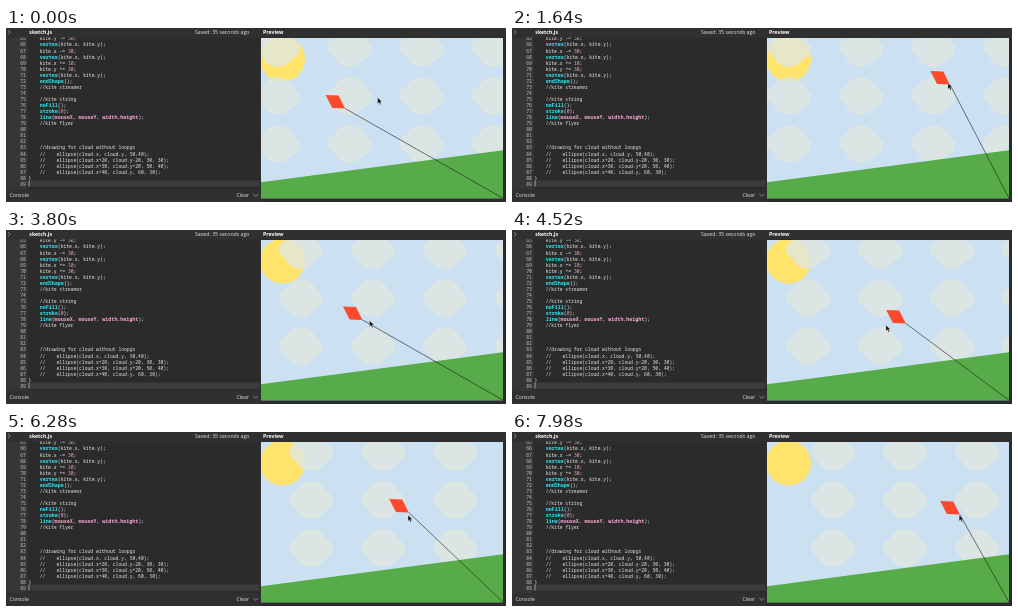
Recreate the animation shown at these times as an HTML page. Size 500 px wide and 174 px high, loop 8 s.

```html
<!DOCTYPE html>
<html lang="en">
<head>
<meta charset="utf-8">
<title>Kite sketch</title>
<style>
  html, body { margin: 0; width: 100%; height: 100%; overflow: hidden; background: #2b2b2b; }
  svg { display: block; width: 100vw; height: 100vh; }
  text { white-space: pre; }
  .ui { font: 5.2px "Open Sans", "Noto Sans", sans-serif; fill: #e4e4e4; }
  .title { font-weight: 700; fill: #fff; }
  .code { font: 500 4.7px "Noto Sans Mono", "DejaVu Sans Mono", monospace; fill: #f2f2f2; }
  .num { fill: #c4c4c4; }
  .fn, .var { font-size: 5.05px; font-weight: 700; }
  .fn { fill: #2fe6ee; }
  .var, .lit { fill: #f7a6d3; }
  .note { fill: #e4e4e4; }
</style>
</head>
<body>
<svg viewBox="0 0 500 174" preserveAspectRatio="none">
  <defs>
    <clipPath id="stage"><rect x="255" y="10" width="242" height="160.3"/></clipPath>
    <g id="cloud" fill="#e0e7e1" opacity=".8">
      <ellipse rx="17.5" ry="19"/>
      <ellipse cx="-8" cy="-.5" rx="14" ry="10.5"/>
      <ellipse cx="9" cy="1" rx="13.5" ry="10.5"/>
    </g>
  </defs>

  <rect width="500" height="174" fill="#2b2b2b"/>
  <rect y="9" width="21.5" height="152" fill="#363636"/>
  <rect x="21.5" y="152.6" width="232" height="6.2" fill="#3c3c3c"/>
  <path d="M23 153v5.5" stroke="#ddd" stroke-width=".6"/>
  <g id="code" class="code"></g>

  <rect width="500" height="9.5" fill="#303030"/>
  <rect y="161" width="254" height="13" fill="#303030"/>
  <rect x="253.3" width="1.7" height="174" fill="#303030"/>
  <g class="ui">
    <text class="title" x="23.3" y="6">sketch.js</text>
    <text x="189" y="6">Saved: 35 seconds ago</text>
    <text class="title" x="257" y="6">Preview</text>
    <text x="3.5" y="169">Console</text>
    <text x="230.5" y="169">Clear</text>
  </g>
  <path d="M2 2l2.3 2.2L2 6.4M247.4 166l2.4 2.4 2.4-2.4" fill="none" stroke="#aaa" stroke-width=".7"/>

  <g clip-path="url(#stage)">
    <rect x="255" y="10" width="243" height="161" fill="#cbe0f0"/>
    <circle cx="276.5" cy="31" r="22.5" fill="#ffe46b"/>
    <g id="clouds"></g>
    <path d="M255 154.3L498 122v49H255z" fill="#57ab48"/>
    <path id="kite" d="M0 0l-6.5-13-13-.4 6.7 13z" fill="#fd4a2f"/>
    <line id="string" x2="497" y2="170.2" stroke="#1c1c1c" stroke-width=".6"/>
  </g>
  <path id="pointer" d="M0 0v6.2l1.5-1.3 1 2.3 1.1-.5-1-2.2h1.9z" fill="#111" stroke="#eee" stroke-width=".4"/>
</svg>
<script>
const LOOP = 8000, LAG = 120;
const $ = id => document.getElementById(id);

const FIRST_LINE = 65;
const lines = `    kite.y -= 30;
    vertex(kite.x, kite.y);
    kite.x -= 30;
    vertex(kite.x, kite.y);
    kite.x += 10;
    kite.y += 30;
    vertex(kite.x, kite.y);
    endShape();
    //kite streamer

    //kite string
    noFill();
    stroke(0);
    line(mouseX, mouseY, width,height);
    //kite flyer



    //drawing for cloud without loopgs
    //    ellipse(cloud.x, cloud.y, 50,40);
    //    ellipse(cloud.x+20, cloud.y-20, 30, 30);
    //    ellipse(cloud.x+30, cloud.y+20, 50, 40);
    //    ellipse(cloud.x+40, cloud.y, 60, 30);
}
`.split("\n");

const tokens = [
  ["note", /^\/\/.*/],
  ["fn", /^(vertex|endShape|noFill|stroke|line)\b/],
  ["var", /^(mouseX|mouseY|width|height)\b/],
  ["lit", /^\d+/],
  ["", /^(\w+|\s+|.)/]
];

function highlight(line) {
  let html = "";
  while (line) {
    const [kind, rule] = tokens.find(([, r]) => r.test(line));
    const word = line.match(rule)[0];
    html += `<tspan class="${kind}">${word}</tspan>`;
    line = line.slice(word.length);
  }
  return html;
}

$("code").innerHTML = lines.map((line, i) => {
  const y = 12.4 + i * 6.06;
  return `<text class="num" x="19.8" y="${y}" text-anchor="end">${FIRST_LINE + i}</text>` +
    `<text x="22.4" y="${y}">${highlight(line)}</text>`;
}).join("");

for (const y of [20, 68, 116])
  for (let col = 0; col < 4; col++)
    $("clouds").innerHTML += `<use href="#cloud" x="${col * 72}" y="${y}"/>`;

// Each row: time, then values.
const pointerPath = [
  [-120, 338.8, 80.6], [0, 371.5, 69.5], [1520, 437.8, 56.4], [1640, 436, 55],
  [2680, 305.6, 91.3], [2800, 305, 87], [4400, 393.7, 93.4], [4520, 374, 95],
  [5460, 356.7, 38.5], [5580, 371, 38], [6160, 402.7, 80.4], [6280, 402, 83],
  [7860, 447.7, 82.4], [8000, 447, 83]
];
const cloudDrift = [
  [0, 271.5], [1640, 277], [2800, 291], [4520, 296],
  [5580, 298], [6280, 305], [8000, 321]
];

// Smooth curve through unevenly timed keys.
function sample(keys, t) {
  const last = keys.length - 1;
  let i = 0;
  while (i < last - 1 && t >= keys[i + 1][0]) i++;
  const a = keys[i], b = keys[i + 1];
  const before = keys[Math.max(0, i - 1)], after = keys[Math.min(last, i + 2)];
  const span = b[0] - a[0], u = (t - a[0]) / span;
  return a.slice(1).map((p, n) => {
    const k = n + 1, q = b[k];
    const m0 = (q - before[k]) / (b[0] - before[0]) * span;
    const m1 = (after[k] - p) / (after[0] - a[0]) * span;
    const d = q - p;
    return p + u * (m0 + u * (3 * d - 2 * m0 - m1 + u * (m0 + m1 - 2 * d)));
  });
}

const move = (id, x, y) => $(id).setAttribute("transform", `translate(${x} ${y})`);

function draw(now) {
  const t = now % LOOP;
  const [kx, ky] = sample(pointerPath, t - LAG);
  move("pointer", ...sample(pointerPath, t));
  move("kite", kx, ky);
  $("string").setAttribute("x1", kx);
  $("string").setAttribute("y1", ky);
  move("clouds", sample(cloudDrift, t)[0], 0);
}

const start = performance.now();
function tick() {
  draw(performance.now() - start);
  requestAnimationFrame(tick);
}
tick();
</script>
</body>
</html>
```
